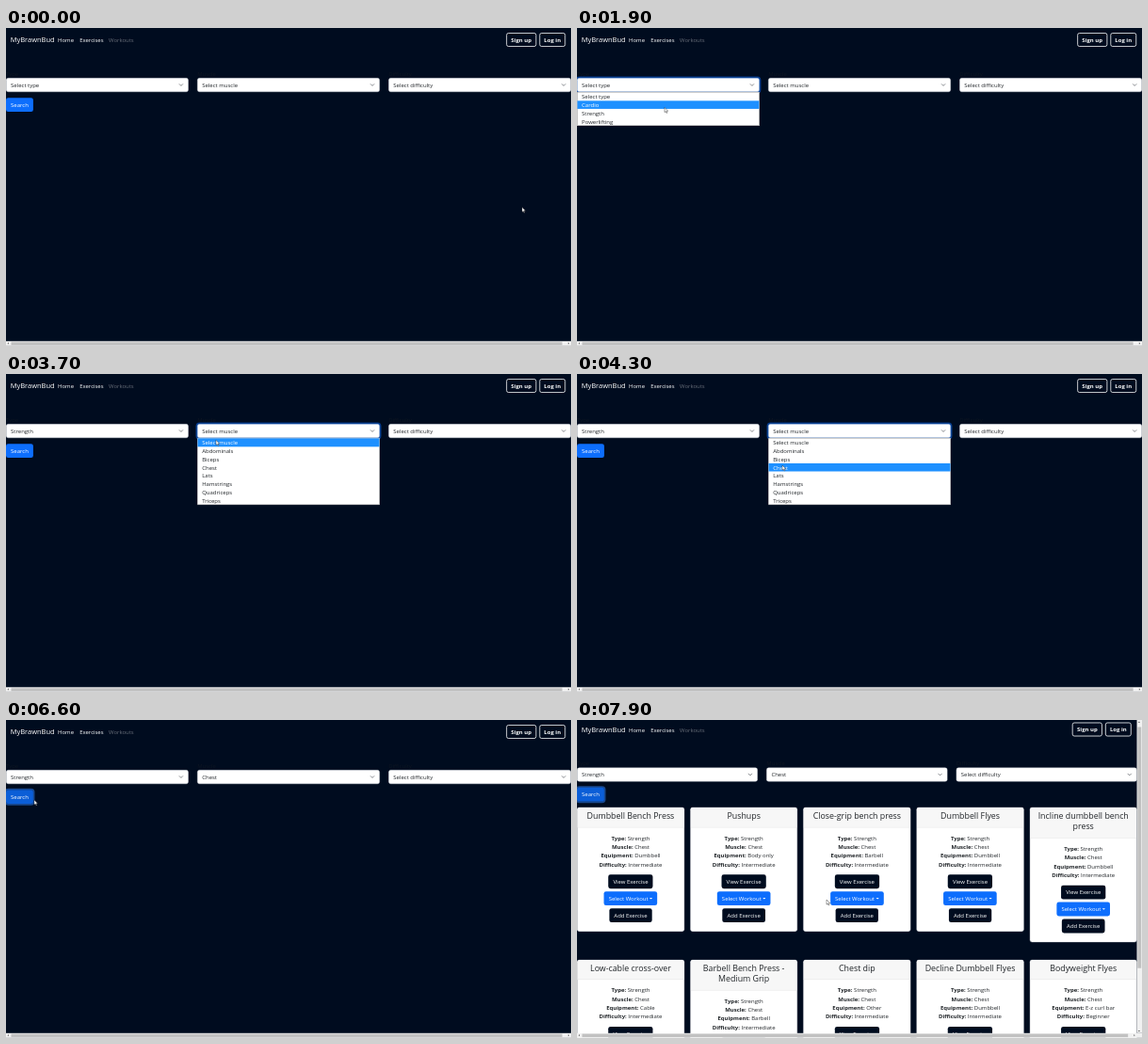
Recreate the animation shown at these times as an HTML page. Size 600x338 px, loop 8000 ms.

```html
<!DOCTYPE html>
<html lang="en">
<head>
<meta charset="utf-8">
<title>Exercise search</title>
<style>
  html, body { margin: 0; width: 100%; height: 100%; overflow: hidden; background: #000c1f; }
  /* Laid out at 1536 px wide, scaled down to a 600 px stage */
  #screen {
    --w: 1536px;
    position: absolute; left: 0; top: 0; width: 1536px; height: 865.28px; overflow: hidden;
    transform: scale(.390625); transform-origin: 0 0;
    background: #000c1f; color: #212529;
    font: 15.3px/24px "Open Sans", "Noto Sans", sans-serif;
  }
  #screen.loaded { --w: 1522.4px; }
  #page { position: absolute; left: 0; top: 0; width: var(--w); height: 1100px; }
  nav { color: #fff; }
  nav span { position: absolute; top: 21px; white-space: nowrap; }
  nav .brand { left: 12px; top: 20px; font-size: 19.2px; }
  nav .off { color: #676d78; }
  .account { position: absolute; right: 15px; top: 13px; display: flex; gap: 8px; }
  .account b { box-sizing: border-box; height: 38px; padding: 5px 11px; border: 2px solid #fff; border-radius: 6px; }

  .filters { position: absolute; top: 112px; width: 100%; display: grid; grid-template-columns: repeat(3, 1fr); gap: 24px; }
  .filter { position: relative; }
  label { display: block; color: #0d1622; }
  .select {
    position: relative; box-sizing: border-box; height: 38px; padding: 6px 12px;
    background: #fff; border: 1px solid #ced4da; border-radius: 6px;
  }
  .select svg { position: absolute; right: 11px; top: 12px; width: 16px; height: 12px; }
  .focus > .select { border-color: #86b7fe; box-shadow: 0 0 0 4px rgba(13, 110, 253, .5); }
  .list {
    display: none; position: absolute; z-index: 2; top: 62px; left: 0; right: 0;
    background: #fff; border: 1px solid #767676; box-sizing: border-box; line-height: 22.5px;
  }
  .open .list { display: block; }
  .list div { padding-left: 12px; }
  .list .hot { background: #1e90ff; color: #fff; }

  .btn { display: inline-block; box-sizing: border-box; height: 38px; padding: 7px 13px; border-radius: 6px; color: #fff; background: #000c1f; white-space: nowrap; }
  .blue { background: #0d6efd; }
  #search { position: absolute; top: 190px; left: 0; }
  #search.hover { background: #0b5ed7; }
  #search.focus { background: #0b5ed7; box-shadow: 0 0 0 4px rgba(49, 132, 253, .5); }

  .cards { display: none; position: absolute; top: 244px; width: 100%; grid-template-columns: repeat(5, 1fr); gap: 48px 16px; align-items: start; }
  .loaded .cards { display: grid; }
  .card { background: #fff; border: 1px solid #d5d7da; border-radius: 6px; overflow: hidden; text-align: center; }
  h4 { margin: 0; padding: 8px 9px 16px; background: #f7f7f7; border-bottom: 1px solid #dfdfdf; font-size: 22.6px; font-weight: 500; line-height: 28.8px; }
  .card p { margin: 16px 0; }
  .card .btn { display: block; width: max-content; margin: 0 auto 8px; }
  .card .btn:last-child { margin-bottom: 24px; }
  .caret::after { content: ""; display: inline-block; margin-left: 4px; vertical-align: 4px; border: 4.8px solid transparent; border-top-color: #fff; border-bottom: 0; }

  .bar, .thumb, .tip { position: absolute; }
  .bar { background: #f1f1f1; }
  .thumb { background: #c1c1c1; }
  .tip { border: 3.5px solid transparent; }
  #hbar { left: 0; bottom: 0; width: 100%; height: 13.2px; }
  #hbar .thumb { left: 13.6px; top: 2px; bottom: 2px; width: calc(var(--w) - 38px); }
  #hbar .tip { top: 3px; }
  #hbar .left { left: 1px; border-right-color: #555; }
  #hbar .right { left: calc(var(--w) - 8px); border-left-color: #555; }
  #vbar { display: none; right: 0; top: 0; width: 13.6px; height: 852.1px; }
  .loaded #vbar { display: block; }
  #vbar .thumb { left: 2px; right: 2px; top: 13.6px; height: 656px; }
  #vbar .tip { left: 3px; }
  #vbar .up { top: 1px; border-bottom-color: #555; }
  #vbar .down { bottom: 1px; border-top-color: #555; }

  #cursor { position: absolute; left: 0; top: 0; z-index: 3; width: 20px; height: 22px; overflow: visible; }
  #cursor path { fill: #fff; stroke: #111; stroke-width: 1; stroke-linejoin: round; }
  #cursor .hand, #cursor.pointing .arrow { display: none; }
  #cursor.pointing .hand { display: inline; }
</style>
</head>
<body>
<div id="screen">
  <div id="page">
    <nav>
      <span class="brand">MyBrawnBud</span>
      <span style="left:141px">Home</span>
      <span style="left:200px">Exercises</span>
      <span class="off" style="left:279px">Workouts</span>
      <div class="account"><b>Sign up</b><b>Log in</b></div>
    </nav>
    <div class="filters"></div>
    <div id="search" class="btn blue">Search</div>
    <div class="cards"></div>
  </div>
  <div id="vbar" class="bar"><i class="tip up"></i><i class="thumb"></i><i class="tip down"></i></div>
  <div id="hbar" class="bar"><i class="tip left"></i><i class="thumb"></i><i class="tip right"></i></div>
  <svg id="cursor">
    <path class="arrow" d="M0 0V13.2L3 10.4L5.2 15.2L7.4 14.2L5.2 9.6H9.4Z"/>
    <path class="hand" d="M-1.5 1Q0-1 1.5 1V6L8 7.5Q10 8 9.5 11L8 17H0L-5 10.5Q-5 8-1.5 10Z"/>
  </svg>
</div>
<script>
const LOOP = 8000, STEP = 100, SCALE = .390625;
const $ = selector => document.querySelector(selector);

const filters = [
  ['Type', ['Select type', 'Cardio', 'Strength', 'Powerlifting']],
  ['Muscle', ['Select muscle', 'Abdominals', 'Biceps', 'Chest', 'Lats', 'Hamstrings', 'Quadriceps', 'Triceps']],
  ['Difficulty', ['Select difficulty']]
];
const exercises = [
  ['Dumbbell Bench Press', 'Dumbbell'],
  ['Pushups', 'Body only'],
  ['Close-grip bench press', 'Barbell'],
  ['Dumbbell Flyes', 'Dumbbell'],
  ['Incline dumbbell bench press', 'Dumbbell'],
  ['Low-cable cross-over', 'Cable'],
  ['Barbell Bench Press - Medium Grip', 'Barbell'],
  ['Chest dip', 'Other'],
  ['Decline Dumbbell Flyes', 'Dumbbell'],
  ['Bodyweight Flyes', 'E-z curl bar', 'Beginner']
];

$('.filters').innerHTML = filters.map(([name, options]) => `
  <div class="filter">
    <label>${name}</label>
    <div class="select"><span>${options[0]}</span>
      <svg viewBox="0 0 16 16"><path d="M2 5l6 6 6-6" fill="none" stroke="#343a40" stroke-width="2" stroke-linecap="round"/></svg>
    </div>
    <div class="list">${options.map(o => `<div>${o}</div>`).join('')}</div>
  </div>`).join('');

$('.cards').innerHTML = exercises.map(([title, equipment, level = 'Intermediate']) => `
  <div class="card">
    <h4>${title}</h4>
    <p><b>Type:</b> Strength<br><b>Muscle:</b> Chest<br><b>Equipment:</b> ${equipment}<br><b>Difficulty:</b> ${level}</p>
    <div class="btn">View Exercise</div>
    <div class="btn blue caret">Select Workout</div>
    <div class="btn">Add Exercise</div>
  </div>`).join('');

// Cursor stops: time, x, y in stage pixels
const path = [
  [0, 548, 190.5], [900, 127, 65], [1000, 126, 64], [1200, 126, 64], [1900, 93, 84.5],
  [2000, 93, 87], [2100, 87, 88], [2400, 87, 88], [3100, 225, 66], [3300, 224, 64],
  [3500, 224, 64], [4200, 219, 96], [4300, 218, 97], [4700, 218, 97], [5400, 23, 88],
  [5600, 16, 82], [6500, 16, 82], [6600, 30, 85], [6800, 30, 85], [6900, 36, 85],
  [7200, 73, 92], [7300, 73, 92], [7500, 277, 160], [7600, 265, 191], [LOOP, 265, 191]
];
// Option under the cursor: [time, index], between opening and closing
const menus = [
  { open: 1200, close: 2300, blur: 3300, pick: 2, hover: [[1200, 0], [1800, 1], [2000, 2]] },
  { open: 3300, close: 4500, blur: 5700, pick: 3, hover: [[3300, 0], [3800, 1], [4000, 2], [4200, 3]] }
];

const fields = [...document.querySelectorAll('.filter')];
const screen_ = $('#screen'), page = $('#page'), search = $('#search'), cursor = $('#cursor');
const vThumb = $('#vbar .thumb');
const smooth = p => p * p * (3 - 2 * p);

function cursorAt(t) {
  const i = path.findIndex(stop => stop[0] > t);
  const [t0, x0, y0] = path[i - 1], [t1, x1, y1] = path[i];
  const p = smooth((t - t0) / (t1 - t0));
  return [x0 + (x1 - x0) * p, y0 + (y1 - y0) * p];
}

function drawMenu(menu, i, t) {
  const field = fields[i], options = filters[i][1];
  field.classList.toggle('open', t >= menu.open && t < menu.close);
  field.classList.toggle('focus', t >= menu.open && t < menu.blur);
  field.querySelector('.select span').textContent = options[t >= menu.close ? menu.pick : 0];
  const hot = menu.hover.filter(([at]) => at <= t).pop();
  [...field.querySelector('.list').children].forEach((row, n) =>
    row.classList.toggle('hot', !!hot && hot[1] === n));
}

function draw(now) {
  const t = Math.floor(now % LOOP / STEP) * STEP;
  menus.forEach((menu, i) => drawMenu(menu, i, t));

  const onSearch = t >= 5400 && t < 6600;
  search.classList.toggle('hover', t >= 5500 && t < 6600);
  search.classList.toggle('focus', t >= 5700);
  screen_.classList.toggle('loaded', t >= 6900);

  const scroll = t >= 7900 ? 6.4 : t >= 7800 ? 2.4 : 0;
  page.style.transform = `translateY(${-scroll}px)`;
  vThumb.style.transform = `translateY(${scroll * .8}px)`;

  const [x, y] = cursorAt(t);
  cursor.classList.toggle('pointing', onSearch);
  cursor.style.transform = `translate(${x / SCALE}px, ${y / SCALE}px)`;
}

const start = performance.now();
function tick() {
  draw(performance.now() - start);
  requestAnimationFrame(tick);
}
tick();
</script>
</body>
</html>
```
